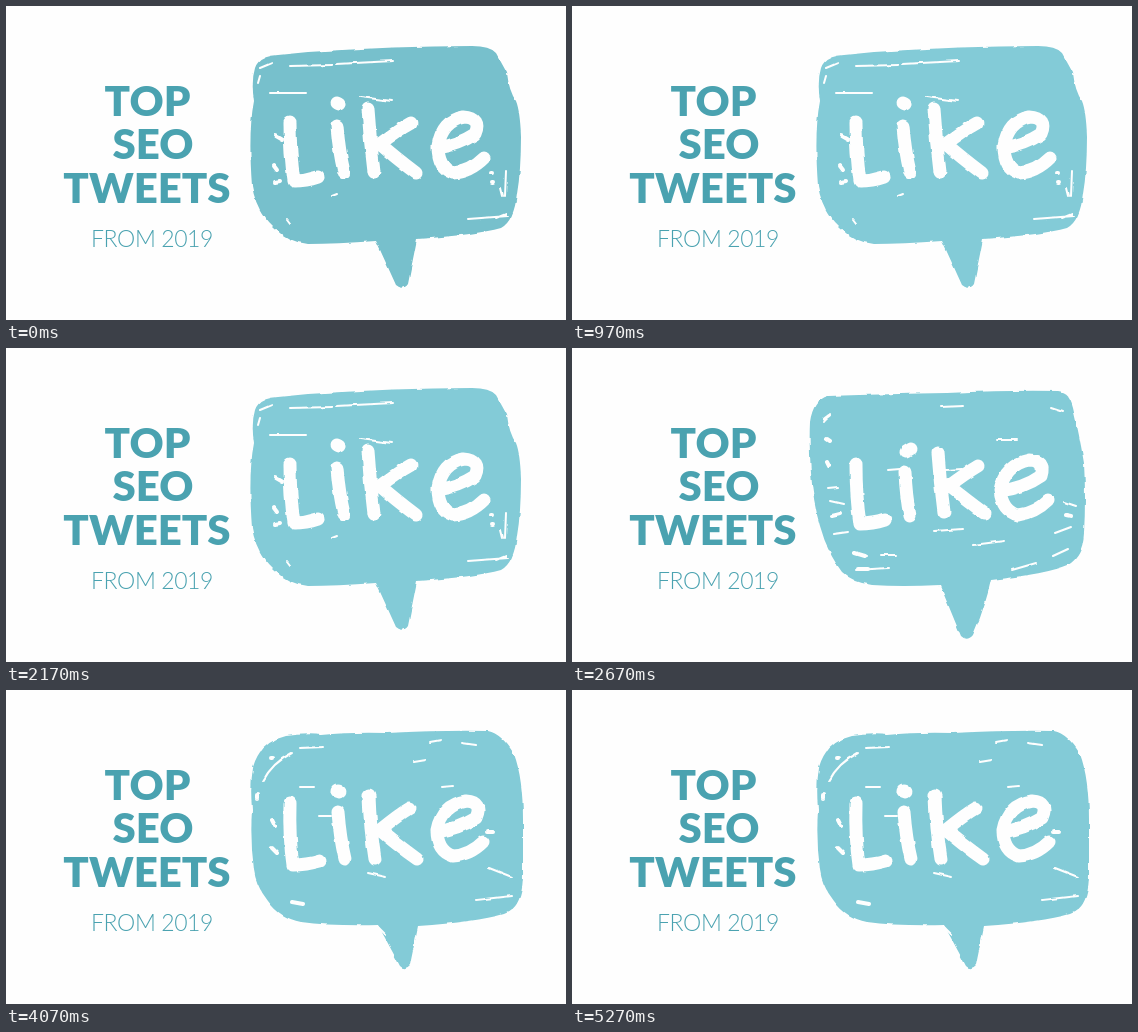
Animation of 560 by 314 pixels, one loop 5.31 s. Source, as an HTML page:

```html
<!DOCTYPE html>
<html lang="en">
<head>
<meta charset="utf-8">
<title>Like bubble</title>
<style>
  html, body { margin: 0; width: 100%; height: 100%; overflow: hidden; background: #fefefe; }
  svg { display: block; width: 560px; height: 314px; }
  text { text-anchor: middle; fill: #4aa2b0; }
  .title { font: 900 42px Lato, sans-serif; }
  .sub { font: 300 23px Lato, sans-serif; letter-spacing: -.4px; }
  .pose { visibility: hidden; }
  .pose path { fill: none; stroke: #fefefe; stroke-linecap: round; stroke-linejoin: round; }
  .pose .bubble { fill: currentColor; stroke: none; }
  .pose .word { stroke-width: 13; }
  .pose .scratch { stroke-width: 2; }
  .pose .nick { stroke-width: 4; }
</style>
</head>
<body>
<svg viewBox="0 0 560 314">
  <defs id="filters"></defs>

  <g class="title">
    <text x="141.5" y="110">TOP</text>
    <text x="147" y="153">SEO</text>
    <text x="141" y="197">TWEETS</text>
  </g>
  <text class="sub" x="146" y="240.5">FROM 2019</text>

  <g class="pose">
    <path class="bubble" d="M249 62Q253 50 272 49L302 46Q390 40 466 40Q484 40 490 47L501 67Q503 85 510 95Q514 105 515 130Q515 165 511 188Q508 215 495 222Q470 229 411 233L402 278Q397 285 390 279L370 235Q330 238 302 238Q282 236 268 222Q250 205 246 180Q242 125 248 95Q245 75 249 62Z"/>
    <path class="scratch" d="M254 62L266 57M252 77L254 70M284 60L326 59M330 58L387 55M264 87L300 87M354 91L386 95M281 213L284 217M326 190L331 188M462 213L502 210M495 182L497 190M500 165L499 190M490 212L500 208"/>
    <path class="nick" d="M269 130L276 134M269 176L274 175M268 160L271 164M485 167h1M486 176h1"/>
    <path class="word" d="M284 116Q284 148 288 175Q300 175 312 171M331 120Q333 145 338 166M331 97L333 98M362 103Q364 135 368 166M405 117Q392 124 374 138Q390 152 410 167M432 142Q452 139 469 128Q476 112 458 111Q436 115 432 140Q432 162 447 167Q464 166 478 152"/>
  </g>

  <g class="pose">
    <path class="bubble" d="M247 77Q254 52 280 46Q300 43 315 45Q345 42 380 43Q440 40 482 41Q496 44 508 64Q517 88 517 130L517 180Q518 218 498 224Q470 232 412 236L404 275Q399 281 394 276Q384 257 372 235Q325 236 295 232Q274 228 262 211Q250 196 248 180Q244 150 246 120Q244 95 247 77Z"/>
    <path class="scratch" d="M257 91Q266 73 286 63M294 58L318 57M408 72L420 70M424 52L435 50M456 53L470 55M294 97L308 97M313 126L325 126M436 97L447 96M362 183L380 187M470 210L505 206M483 178L506 187M372 237L379 244"/>
    <path class="nick" d="M265 68h1M266 130L269 136M266 158L271 163M286 212L297 214M481 142h5M251 105v4"/>
    <path class="word" d="M284 113Q283 148 287 175Q300 175 314 171M332 122Q334 148 339 169M331 101L334 102M363 106Q364 138 369 169M404 118Q392 125 374 140Q390 154 411 169M431 142Q452 139 470 128Q477 112 460 111Q436 115 431 140Q431 161 447 166Q464 165 477 152"/>
  </g>

  <g class="pose">
    <path class="bubble" d="M238 74Q241 52 256 48Q320 46 375 45Q440 42 486 43Q497 44 501 60Q507 85 512 115Q514 150 512 185Q511 208 496 217Q475 226 419 232Q413 260 401 287Q395 294 389 288L368 237Q330 239 300 237Q282 235 270 224Q255 204 248 178Q241 155 239 125Q237 95 238 74Z"/>
    <path class="scratch" d="M252 74L258 66M368 59L392 58M479 60L491 64M425 92L445 92M256 140L266 139M258 153L271 156M262 186L276 184M282 205L295 208M309 207L325 207M284 222L316 220M363 183L390 181M401 197L432 193M483 185L499 179M481 208L496 201M440 222L464 215M492 154L504 158M316 122L328 121M373 122L390 121"/>
    <path class="nick" d="M253 71L257 68M255 91L258 93M255 114L257 118M260 168L268 166M283 205L293 208M286 221L296 221M494 167L499 168"/>
    <path class="word" d="M284 116Q284 149 288 176Q300 176 313 172M333 124Q334 148 338 168M334 104L339 101M366 105Q368 135 372 164M406 118Q394 125 377 138Q392 150 412 165M428 143Q452 140 469 128Q474 112 457 112Q433 117 428 142Q430 163 446 167Q463 165 476 152"/>
  </g>
</svg>
<script>
const LOOP = 5310, HOLD = 100;
const svg = document.querySelector('svg');
const poses = [...document.querySelectorAll('.pose')];

// Each pose gets its own ragged brush edge.
document.getElementById('filters').innerHTML = poses.map((_, i) => `
  <filter id="rough${i}" filterUnits="userSpaceOnUse" x="220" y="30" width="320" height="275">
    <feTurbulence type="fractalNoise" baseFrequency=".08" numOctaves="2" seed="${i + 3}"/>
    <feDisplacementMap in="SourceGraphic" scale="3" xChannelSelector="R" yChannelSelector="G"/>
  </filter>`).join('');
poses.forEach((pose, i) => pose.setAttribute('filter', `url(#rough${i})`));

function draw() {
  const t = performance.now() % LOOP;
  const current = Math.floor(t / HOLD) % poses.length;
  poses.forEach((pose, i) => pose.style.visibility = i === current ? 'visible' : 'hidden');
  svg.style.color = t < 30 ? '#77c0cc' : '#83cbd7';
  requestAnimationFrame(draw);
}
draw();
</script>
</body>
</html>
```
